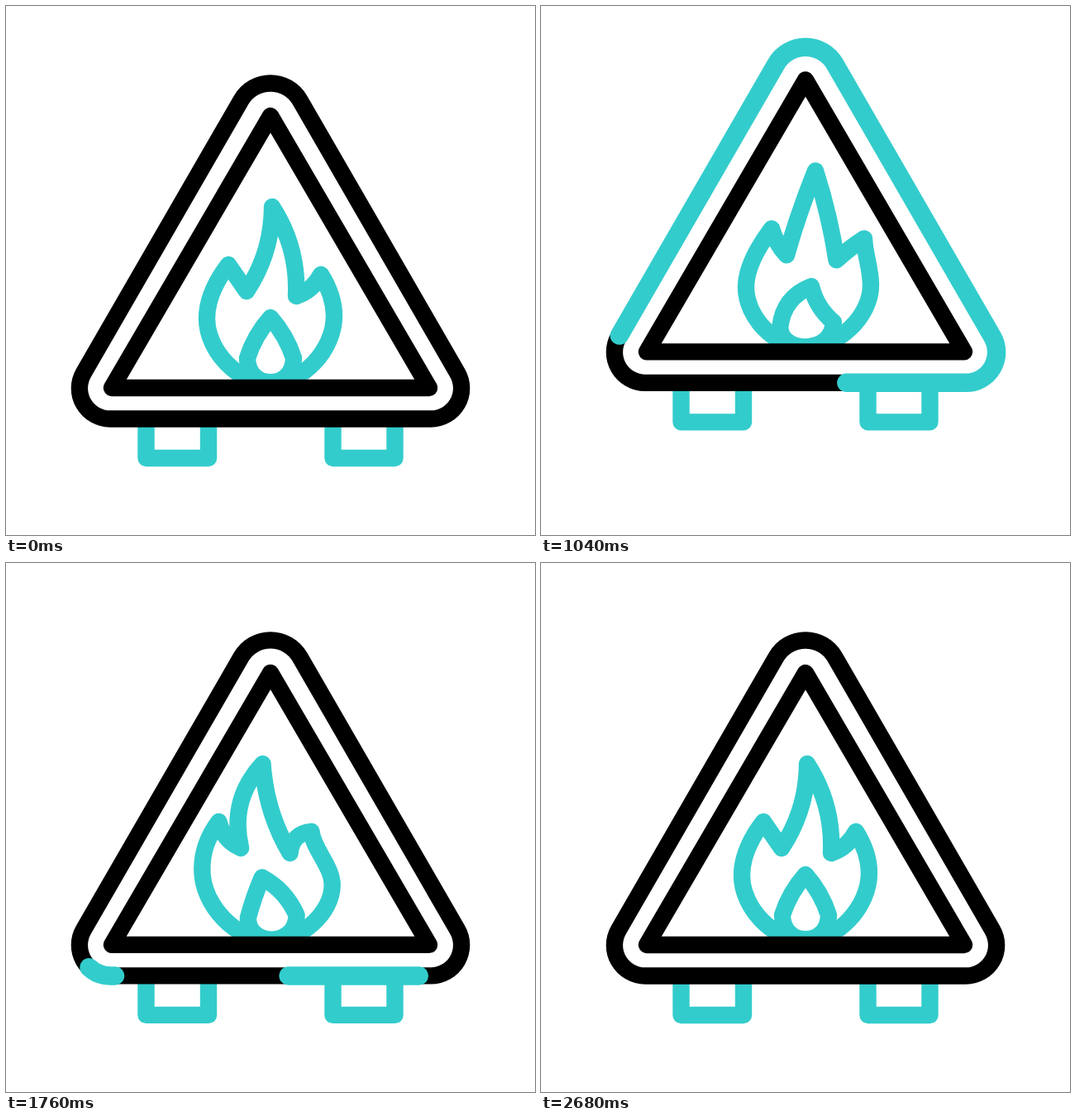
Recreate the animation shown at these times as an HTML page. Size 640 px wide and 640 px high, loop 2.8 s.

```html
<!DOCTYPE html>
<html lang="en">
<head>
<meta charset="utf-8">
<title>Fire warning sign</title>
<style>
  html, body { margin: 0; width: 100%; height: 100%; overflow: hidden; background: #fff; }
  svg { display: block; width: 100%; height: 100%; }
  path { fill: none; stroke-width: 20.4; stroke-linejoin: round; }
  .teal { stroke: #33cccc; }
  .black { stroke: #000; }
  .run { stroke-width: 22.5; stroke-linecap: round; }
</style>
</head>
<body>
<svg viewBox="0 0 640 640">
  <g id="sign">
    <path id="flame" class="teal"/>
    <path id="drop" class="teal"/>
    <path class="teal" d="M169.5 500V547H245V500M395.5 500V547H470.5V500"/>
    <path class="black" d="M128 462H512L320 133Z"/>
    <path id="frame" class="black"/>
    <path id="sweep" class="teal run"/>
    <path id="dash" class="teal run"/>
  </g>
</svg>
<script>
const LOOP = 2800, STEP = 40;
const $ = id => document.getElementById(id);
const setPath = (id, d) => $(id).setAttribute('d', d);
const clamp = x => Math.min(1, Math.max(0, x));
const smooth = u => u * u * (3 - 2 * u);

// Ease from 0 to 1 between two times, like cubic-bezier(a, 0, b, 1)
function ease(t, from, to, a = 0.6, b = 0.2) {
  const x = clamp((t - from) / (to - from));
  let lo = 0, hi = 1;
  for (let i = 0; i < 20; i++) {
    const u = (lo + hi) / 2, v = 1 - u;
    if (3 * u * v * v * a + 3 * u * u * v * b + u * u * u < x) lo = u; else hi = u;
  }
  return smooth((lo + hi) / 2);
}

// Rounded triangle, counter-clockwise from the lower left corner
const start = 'M93.9 443.8';
const lap = 'A37.1 37.1 0 0 0 126 499.5H514A37.1 37.1 0 0 0 546.1 443.8' +
  'L355.6 114A41.1 41.1 0 0 0 284.4 114L93.9 443.8';
const LAP = 1391, DRIFT = 0.275;
setPath('frame', start + lap + 'Z');
setPath('sweep', start + lap + lap);
setPath('dash', start + lap);

// time, flame lean, flame curl, drop lean, drop twist
const keys = [
  [80, 0, 0, 0, 0],
  [360, -11, 0.6, -1, -0.2],
  [720, 0, 0, 26, 0],
  [1040, 10, 0.45, 7, 0.9],
  [1480, -25.5, 1.15, -18, -1.1],
  [2120, 9, 0.9, 1, 0.9],
  [2680, 0, 0, 0, 0]
];

function pose(t) {
  const i = keys.findIndex(k => k[0] > t);
  if (i < 1) return [0, 0, 0, 0];
  const p = keys[i - 1], q = keys[i];
  const u = smooth((t - p[0]) / (q[0] - p[0]));
  return p.map((v, c) => v + (q[c] - v) * u).slice(1);
}

// Quadratic arc between two points, bent sideways by b
function bend([x, y], [X, Y], b) {
  const dx = X - x, dy = Y - y, k = 2 * b / Math.hypot(dx, dy);
  return `Q${(x + X) / 2 - dy * k} ${(y + Y) / 2 + dx * k} ${X} ${Y}`;
}

// The tips follow the lean fully, the notches and sides only in part
function flamePath(lean, curl) {
  const left = [269 + lean, 313], tip = [322 + lean, 243], right = [381 + lean, 325];
  const notchL = [291 + 0.6 * lean, 345], notchR = [351 + 0.65 * lean, 351];
  const [lx, ly] = left, [rx, ry] = right;
  const ex = 397 + 0.2 * lean, ey = 375 + 14 * curl;
  const wx = 243 + 0.5 * lean, wy = 378 + 0.6 * lean;
  const bx = 320, by = 457, k = 0.5;
  return `M${left}` +
    bend(left, notchL, 5 * curl) +
    bend(notchL, tip, 8 - 21 * curl) +
    bend(tip, notchR, -9 + 15 * curl) +
    bend(notchR, right, 4 - 11 * curl) +
    `C${rx + 10 - 12 * curl - 0.4 * lean} ${ry + 16 + 5 * curl} ` +
    `${ex} ${ey - 0.35 * (ey - ry)} ${ex} ${ey}` +
    `C${ex} ${ey + k * (by - ey)} ${bx + k * (ex - bx)} ${by} ${bx} ${by}` +
    `C${bx + k * (wx - bx)} ${by} ${wx} ${wy + k * (by - wy)} ${wx} ${wy}` +
    `C${wx} ${wy - 0.35 * (wy - ly)} ${lx - 15} ${ly + 20} ${lx} ${ly}Z`;
}

function dropPath(lean, twist) {
  const q = clamp(Math.hypot(twist, lean / 20));
  const tip = [320 + lean, 377 + 6 * q];
  const right = [348 + 6 * q, 426], left = [292 - 3 * twist, 426 + 6 * q];
  return `M${tip}` + bend(tip, right, -3 + 8 * twist) +
    `C${right[0]} 465 ${left[0]} 465 ${left}` + bend(left, tip, -3 - 7 * twist) + 'Z';
}

function showRun(id, from, length) {
  const s = $(id).style;
  s.display = length > 0.5 ? '' : 'none';
  s.strokeDasharray = `${length} 9999`;
  s.strokeDashoffset = -from;
}

function draw(now) {
  const t = Math.floor(now % LOOP / STEP) * STEP;
  const lift = 45.2 * (ease(t, 120, 880, 0.5, 0.35) - ease(t, 885, 1815));
  $('sign').setAttribute('transform', `translate(0 ${-lift})`);

  const [lean, curl, dropLean, twist] = pose(t);
  setPath('flame', flamePath(lean, curl));
  setPath('drop', dropPath(dropLean, twist));

  const head = LAP * ease(t, 120, 1740), tail = LAP * ease(t, 727, 2355);
  showRun('sweep', tail + DRIFT * (t - 120), head - tail);
  showRun('dash', DRIFT * (t - 1580), 68 * Math.sin(Math.PI * clamp((t - 1580) / 1080)));
}

const begin = performance.now();
function tick() {
  draw(performance.now() - begin);
  requestAnimationFrame(tick);
}
tick();
</script>
</body>
</html>
```
